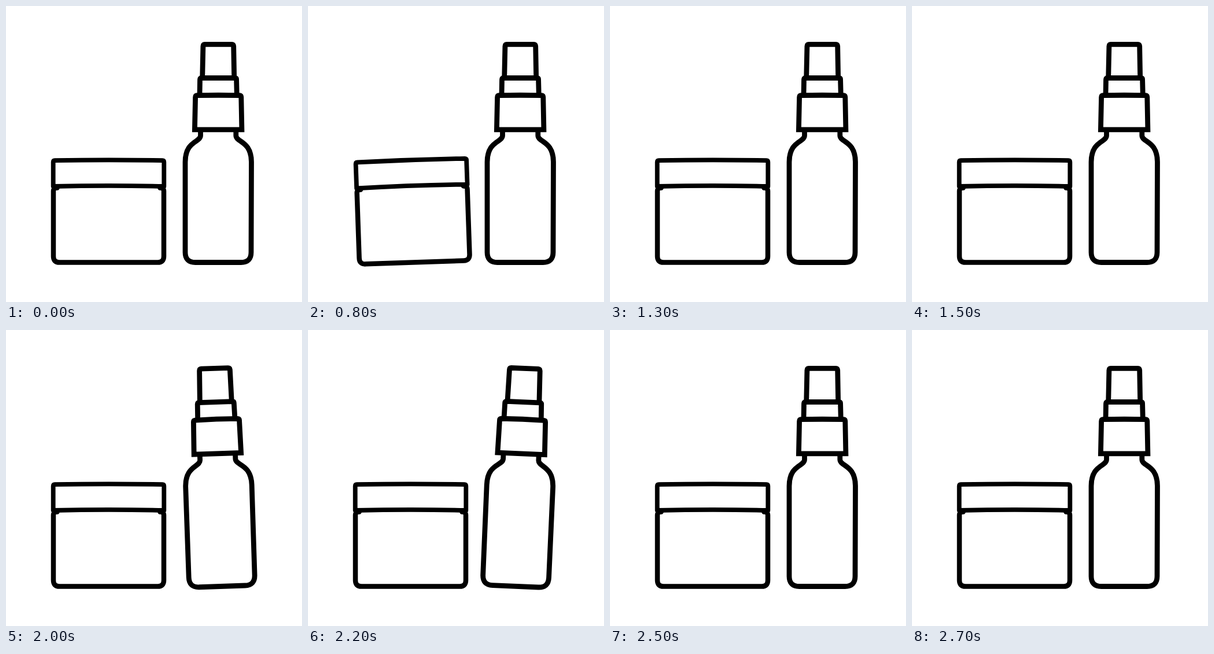
An HTML page for the animation above (2800 ms loop, 512 by 512 pixels).

```html
<!DOCTYPE html>
<html lang="en">
<head>
<meta charset="utf-8">
<title>Jar and bottle</title>
<style>
  html, body { margin: 0; width: 100%; height: 100%; overflow: hidden; background: #fff; }
  svg { display: block; width: 100%; height: 100%; }
  path { fill: none; stroke: #000; stroke-width: 8.8; }
</style>
</head>
<body>
<svg viewBox="0 0 512 512">
  <g id="jar">
    <path stroke-linejoin="round" style="stroke-width: 7.8"
      d="M81.7 312V270Q81.7 267.2 84.5 267.1Q178 265.6 270.500 267.1Q273.300 267.2 273.300 270V312Q178 309.800 81.700 312Z"/>
    <path stroke-linecap="round" style="stroke-width: 8.5"
      d="M88.500 314.600Q82 314.500 82 320V433Q82 443.500 92.500 443.500H262.500Q273 443.500 273 433V320Q273 314.500 266.500 314.600"/>
  </g>
  <g id="bottle">
    <path d="M339.700 124L340.900 69.500Q341 66.400 344 66.300H390.500Q393.500 66.400 393.700 69.500L394.700 124"/>
    <path d="M335 154L335.500 127Q335.500 124.500 338 124.500H396Q398.500 124.500 398.600 127L399.300 154"/>
    <path d="M326.400 213.800L327.600 157.500Q327.700 154.800 330.500 154.700Q367 153.800 404 154.700Q406.700 154.800 406.800 157.500L407.900 213.800Z"/>
    <path d="M336.500 214V224C336.500 236 310 233 310 270V426Q310 443.500 327.500 443.500H406.500Q424 443.500 424 426L424.500 270C424.500 233 397.800 236 397.800 224V214"/>
  </g>
</svg>
<script>
  const LOOP = 2800, STEP = 100, SWING = 800;
  const tilts = [-2, 0, 2.4, 0];
  const parts = [
    { el: document.getElementById("jar"), start: 800, pivot: "178 245" },
    { el: document.getElementById("bottle"), start: 2000, pivot: "367 250" },
  ];

  function draw(now) {
    const t = now % LOOP;
    for (const { el, start, pivot } of parts) {
      const local = t - start;
      const swinging = local >= 0 && local < SWING;
      const angle = swinging ? tilts[Math.floor(local / STEP) % tilts.length] : 0;
      el.setAttribute("transform", `rotate(${angle} ${pivot})`);
    }
    requestAnimationFrame(draw);
  }
  draw(0);
</script>
</body>
</html>
```
